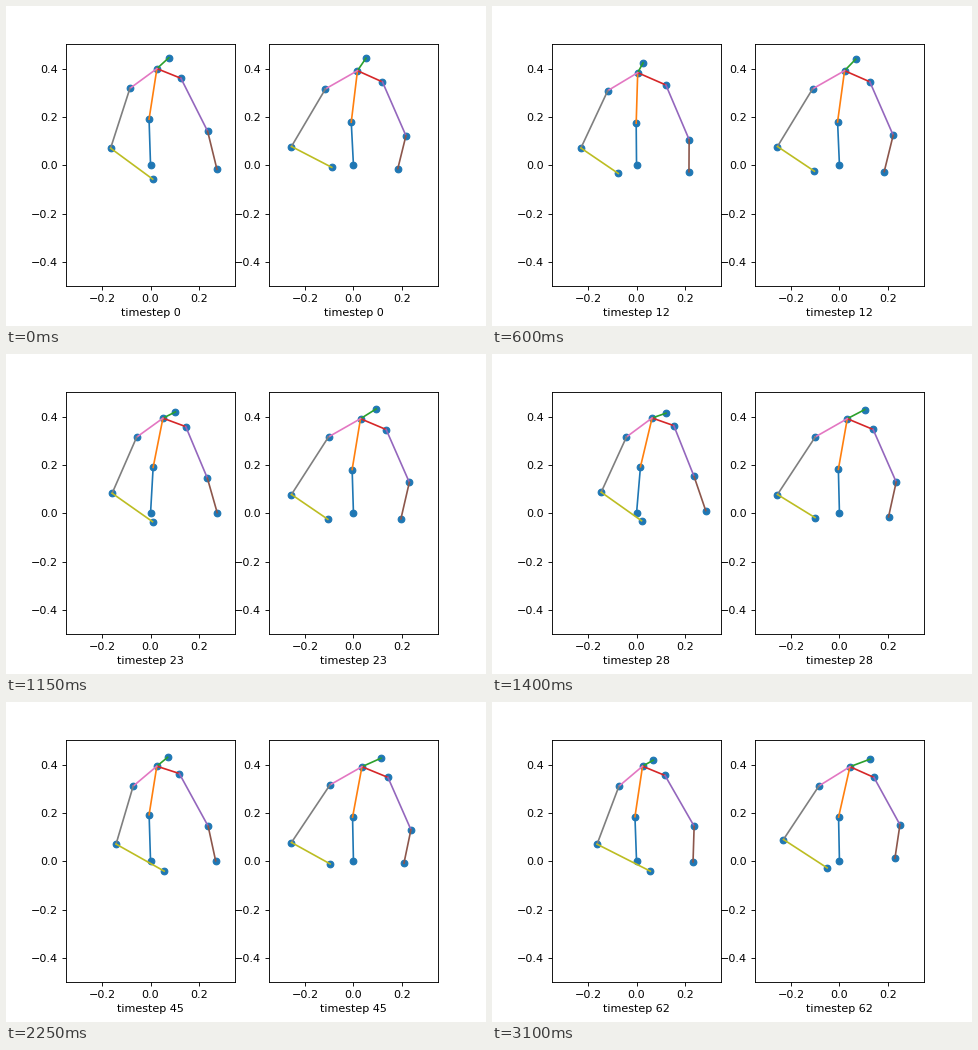
Recreate the animation shown at these times as a matplotlib script. Size 480x320 px, loop 3.15 s.

```python
import numpy as np
import matplotlib.pyplot as plt
from matplotlib.animation import FuncAnimation

FRAMES, INTERVAL = 63, 50
UNIT = 241.6  # pixels per data unit

# "a" and "b" are the two arms, named from shoulder to wrist
JOINTS = ["hip", "spine", "neck", "head",
          "shoulder_a", "elbow_a", "wrist_a",
          "shoulder_b", "elbow_b", "wrist_b"]
CHAINS = [["hip", "spine", "neck", "head"],
          ["neck", "shoulder_a", "elbow_a", "wrist_a"],
          ["neck", "shoulder_b", "elbow_b", "wrist_b"]]
BONES = [bone for chain in CHAINS for bone in zip(chain, chain[1:])]


def bump(step, peak, width):
    return np.exp(-((step - peak) / width) ** 2)


def ease(step, start, end):
    t = np.clip((step - start) / (end - start), 0, 1)
    return t * t * (3 - 2 * t)


def settle(step):
    return ease(step, 0, 37)


def late(step):
    return ease(step, 45, 62)


def lean_back(step):
    return bump(step, 12, 8)


def lean_forward(step):
    return bump(step, 28, 9)


def dip(step):
    return bump(step, 17, 11)


# A pose is the rest pose plus each move's offsets scaled by its signal.
# Places and offsets are in pixels from the hip, y upwards.
LEFT = dict(
    rest=dict(spine=(-1.6, 46.5), neck=(7, 97), head=(19.7, 108),
              shoulder_a=(30.5, 87.7), elbow_a=(57.6, 35), wrist_a=(68, -3.7),
              shoulder_b=(-19.6, 77), elbow_b=(-38, 17), wrist_b=(4.8, -14.5)),
    moves={
        lean_back: dict(spine=(1, -4.5), neck=(-6, -4), head=(-13, -4.5),
                        shoulder_a=(-1, -7.5), elbow_a=(-5, -9.5),
                        wrist_a=(-15, -4), shoulder_b=(-10, -2),
                        elbow_b=(-18.5, 0), wrist_b=(-25, 5)),
        lean_forward: dict(spine=(5.5, 0), neck=(9.5, 0), head=(12.5, -4.5),
                           shoulder_a=(8.5, 0), elbow_a=(0, 2), wrist_a=(4, 3),
                           shoulder_b=(8, 1), elbow_b=(0, 4), wrist_b=(-7, 3)),
        settle: dict(neck=(-1, -2), head=(-3, -4), shoulder_a=(-2, 0),
                     wrist_a=(-3, 4), shoulder_b=(2, -2),
                     elbow_b=(3.5, 0), wrist_b=(9, 4.5)),
        late: dict(spine=(0, -2), head=(0, -3), shoulder_a=(0, -2),
                   wrist_a=(-8.5, -1), elbow_b=(-5, 0)),
    },
)
RIGHT = dict(
    rest=dict(spine=(-2.2, 43), neck=(4, 94.5), head=(12.5, 107),
              shoulder_a=(29, 83.3), elbow_a=(52.5, 29.5), wrist_a=(44.5, -3),
              shoulder_b=(-28, 76.3), elbow_b=(-62, 18.7), wrist_b=(-21.3, -1.7)),
    moves={
        settle: dict(spine=(1.3, 1), neck=(4.5, 0), head=(15, -4),
                     shoulder_a=(5.5, 0.5), elbow_a=(5, 2), wrist_a=(6, 1),
                     shoulder_b=(4.5, 0), wrist_b=(-2, -1)),
        dip: dict(wrist_a=(-1.5, -4.5), wrist_b=(-4, -5)),
        late: dict(neck=(2, 0), head=(3, -1), elbow_a=(3, 5), wrist_a=(5, 5),
                   shoulder_b=(3, -1), elbow_b=(6, 3), wrist_b=(11, -4)),
    },
)


def pose(body, step):
    points = {name: np.array(body["rest"].get(name, (0, 0)), float)
              for name in JOINTS}
    for signal, offsets in body["moves"].items():
        for name, offset in offsets.items():
            points[name] += signal(step) * np.array(offset)
    return {name: point / UNIT for name, point in points.items()}


class Skeleton:
    def __init__(self, ax, body):
        self.ax, self.body = ax, body
        blank = np.zeros(len(JOINTS))
        self.dots = ax.scatter(blank, blank, color="C0")
        self.lines = [ax.plot([], [], color=f"C{k}")[0] for k in range(len(BONES))]
        ax.set(xlim=(-0.35, 0.35), ylim=(-0.5, 0.5),
               xticks=[-0.2, 0, 0.2], yticks=[-0.4, -0.2, 0, 0.2, 0.4])

    def draw(self, step):
        points = pose(self.body, step)
        self.dots.set_offsets(list(points.values()))
        for line, (a, b) in zip(self.lines, BONES):
            line.set_data(*zip(points[a], points[b]))
        self.ax.set_xlabel(f"timestep {step}")


fig, axes = plt.subplots(1, 2, figsize=(6, 4), dpi=80)
fig.subplots_adjust(left=0.125, right=0.9, bottom=0.125, top=0.88, wspace=0.2)
skeletons = [Skeleton(ax, body) for ax, body in zip(axes, (LEFT, RIGHT))]


def update(step):
    for skeleton in skeletons:
        skeleton.draw(step)


anim = FuncAnimation(fig, update, frames=FRAMES, interval=INTERVAL,
                     repeat=True, repeat_delay=0, blit=False)
plt.show()
```
